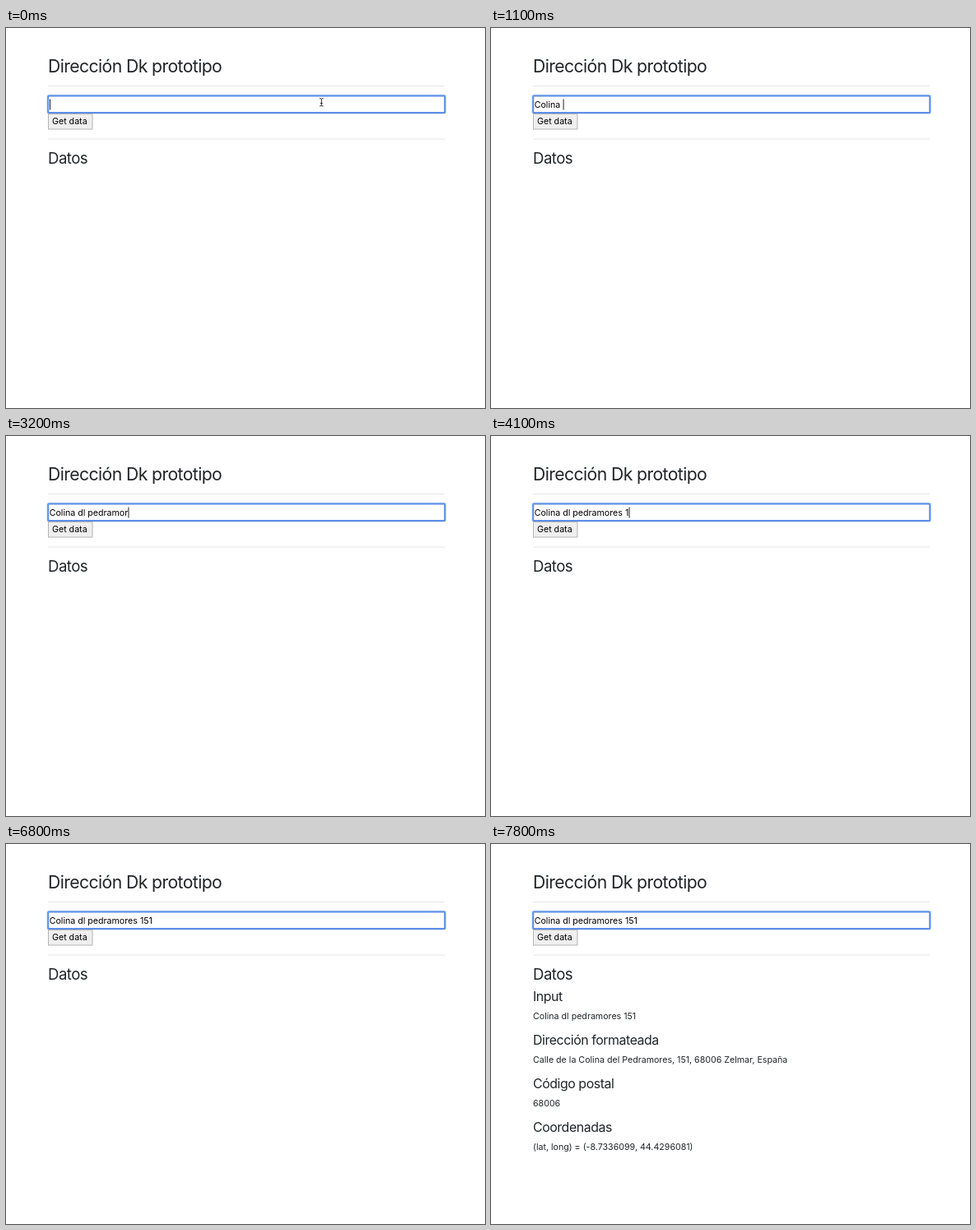
An HTML page that plays this animation: 582 by 462 pixels, repeating every 8 s.

```html
<!DOCTYPE html>
<html lang="es">
<head>
<meta charset="utf-8">
<title>Prototipo</title>
<style>
  html, body { margin: 0; width: 100%; height: 100%; overflow: hidden; background: #fff; }
  svg { display: block; }
  text { font: 10.65px Inter, "Liberation Sans", sans-serif; font-optical-sizing: none; fill: #212529; white-space: pre; }
  .h2 { font-size: 21.2px; letter-spacing: -.028em; }
  .h3 { font-size: 18.6px; letter-spacing: -.028em; }
  .h4 { font-size: 15.9px; letter-spacing: -.028em; }
  .ui { fill: #000; }
</style>
</head>
<body>
<svg id="stage" width="582" height="462" viewBox="0 0 582 462"></svg>
<script>
const LOOP = 8000, BLINK = 500, LEFT = 51, FIELD = 52.7;
const QUERY = "Colina dl pedramores 151";
const FOUND_AT = 7300, REFINED_AT = 7600;

const stage = document.getElementById("stage");

function add(tag, attrs, parent = stage) {
  const el = document.createElementNS("http://www.w3.org/2000/svg", tag);
  for (const key in attrs) el.setAttribute(key, attrs[key]);
  return parent.appendChild(el);
}

function write(str, x, y, cls = "", parent = stage) {
  const el = add("text", { x, y, class: cls }, parent);
  el.textContent = str;
  return el;
}

const show = (el, on) => el.setAttribute("visibility", on ? "visible" : "hidden");
const rule = y => add("rect", { x: LEFT, y, width: 482, height: 1, fill: "#e5e5e5" });

// Page
write("Dirección Dk prototipo", LEFT, 54, "h2");
rule(70);
const box = { x: 51.2, y: 82.6, width: 482, height: 20.4, rx: 1 };
add("rect", { ...box, fill: "none", stroke: "#a3c1f6", "stroke-width": 3.6, "stroke-opacity": .6 });
add("rect", { ...box, fill: "#fff", stroke: "#5c8ee6", "stroke-width": 2 });
add("rect", { x: 51.5, y: 104.5, width: 53.5, height: 18.5, fill: "#efefef", stroke: "#b5b5b5" });
write("Get data", 56, 117.2, "ui");
rule(134.5);
write("Datos", LEFT, 165.3, "h3");

// Field
const typed = write("", FIELD, 97, "ui");
const caret = add("rect", { y: 86.5, width: 1, height: 13, fill: "#222" });
const pointer = add("path", {
  d: "M381 85.5Q383 85.5 383.3 86.5Q383.6 85.5 385.6 85.5M383.3 86.5V94M381 95Q383 95 383.3 94Q383.6 95 385.6 95M382 91.5H384.6",
  fill: "none", stroke: "#222", "stroke-width": 1
});

// Results
const results = add("g", {});
const [input, address, postcode, coords] =
  ["Input", "Dirección formateada", "Código postal", "Coordenadas"].map((title, i) => {
    write(title, LEFT, 191.4 + 53 * i, "h4", results);
    return write("", LEFT, 213 + 53 * i, "", results);
  });
input.textContent = QUERY;

const first = ["60153 Los Tarces, Veldria, España", "60153", "(lat, long) = (-8.0126743, 44.9872968)"];
const refined = ["Calle de la Colina del Pedramores, 151, 68006 Zelmar, España", "68006",
  "(lat, long) = (-8.7336099, 44.4296081)"];

// Keystrokes: [time, characters in the field]
const run = (start, from, count) => Array.from({ length: count }, (_, i) => [start + 100 * i, from + i]);
const keys = [
  [0, 0], [200, 1], [400, 2], [600, 3], ...run(800, 4, 6), [1600, 11], [2400, 12],
  ...run(2600, 13, 2), ...run(2900, 15, 6), [3600, 21], [4100, 22], [4300, 23], [6300, 24]
];

function draw(t) {
  const [last, count] = keys.filter(key => key[0] <= t).pop();
  typed.textContent = QUERY.slice(0, count);
  caret.setAttribute("x", FIELD + .3 + (count ? input.getSubStringLength(0, count) : 0));
  show(caret, Math.floor((t - last) / BLINK) % 2 === 0);
  show(pointer, t < keys[1][0]);

  show(results, t >= FOUND_AT);
  const data = t < REFINED_AT ? first : refined;
  [address, postcode, coords].forEach((el, i) => { el.textContent = data[i]; });
}

const begin = performance.now();
function tick() {
  draw((performance.now() - begin) % LOOP);
  requestAnimationFrame(tick);
}
tick();
</script>
</body>
</html>
```
